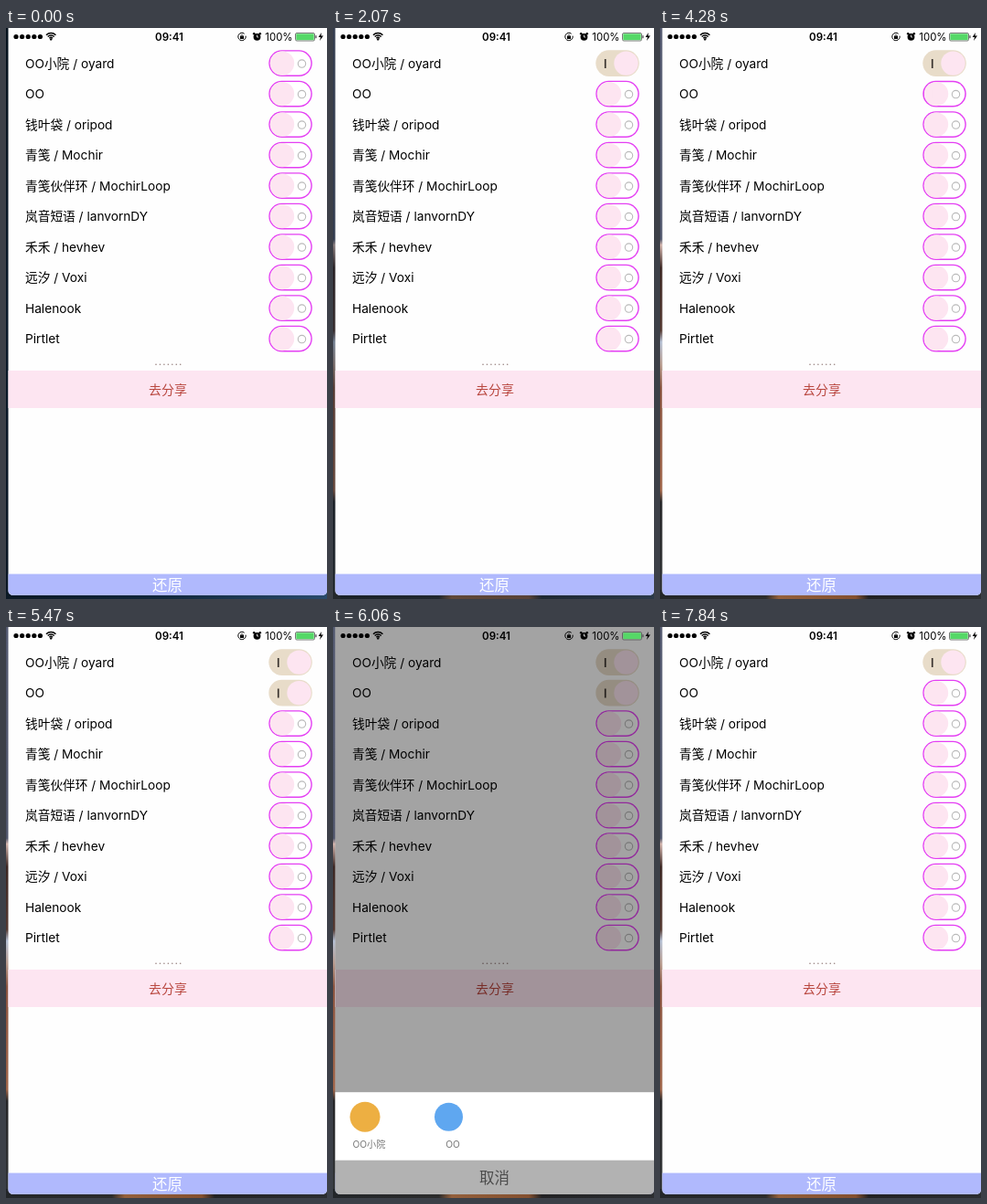
Write an HTML page with a canvas that moves like this. It is 351 px wide and 625 px high and loops after 7990 ms.

```html
<!DOCTYPE html>
<html lang="zh-CN">
<head>
<meta charset="utf-8">
<title>分享开关</title>
<style>
html, body { margin: 0; width: 100%; height: 100%; overflow: hidden; }
canvas { display: block; width: 351px; height: 625px; }
</style>
</head>
<body>
<canvas id="stage"></canvas>
<script>
const W = 351, H = 625, LOOP = 7990;
const FONT = 'Inter, "Noto Sans CJK SC", "Noto Sans CJK", sans-serif';
const PINK = '#fde5f1', TINT = [228, 62, 243], BEIGE = [232, 220, 201];
const ROWS = ['OO小院 / oyard', 'OO', '钱叶袋 / oripod', '青笺 / Mochir', '青笺伙伴环 / MochirLoop',
  '岚音短语 / lanvornDY', '禾禾 / hevhev', '远汐 / Voxi', 'Halenook', 'Pirtlet'];

// Taps per row: [start, end, turns on]
const TAPS = {
  0: [[850, 1150, true], [3080, 3480, false], [3750, 4150, true]],
  1: [[4270, 4590, true], [7530, 7830, false]]
};
const SHEET = { open: 5560, opened: 5960, close: 6850, closed: 7100, height: 111.7 };

const BACKDROPS = [
  { side: [[0, '#07131e'], [0.5, '#0a1a2a'], [1, '#0b1724']],
    base: [[0, '#0c1925'], [0.5, '#12283c'], [1, '#2a4b6c']] },
  { side: [[0, '#545a70'], [0.37, '#50566c'], [0.38, '#d2b4ac'], [0.42, '#3c2723'], [0.53, '#553a32'],
      [0.55, '#b4c0d4'], [0.59, '#b79a8c'], [0.63, '#8a5440'], [0.81, '#a0664a'], [0.83, '#262628'], [1, '#333638']],
    base: [[0, '#232629'], [0.33, '#2c2c2c'], [0.37, '#94603c'], [0.61, '#84502f'], [0.65, '#222224'], [1, '#2c2e31']] }
];

const canvas = document.getElementById('stage');
const ctx = canvas.getContext('2d');
const dpr = window.devicePixelRatio || 1;
canvas.width = W * dpr;
canvas.height = H * dpr;

const clamp = v => Math.max(0, Math.min(1, v));
const ease = v => { v = clamp(v); return v * v * (3 - 2 * v); };
const span = (t, a, b) => clamp((t - a) / (b - a));
const mix = (a, b, k) => `rgb(${a.map((v, i) => Math.round(v + (b[i] - v) * k))})`;

function box(x, y, w, h, fill) {
  ctx.fillStyle = fill;
  ctx.fillRect(x, y, w, h);
}
function pill(x, y, w, h, r, fill) {
  ctx.beginPath();
  ctx.roundRect(x, y, w, h, r);
  ctx.fillStyle = fill;
  ctx.fill();
}
function disc(x, y, r, fill) {
  ctx.beginPath();
  ctx.arc(x, y, r, 0, 7);
  ctx.fillStyle = fill;
  ctx.fill();
}
function ring(x, y, r, color, width, from = 0, to = 7) {
  ctx.beginPath();
  ctx.arc(x, y, r, from, to);
  ctx.strokeStyle = color;
  ctx.lineWidth = width;
  ctx.stroke();
}
function line(points, color, width) {
  ctx.beginPath();
  points.forEach(([x, y]) => ctx.lineTo(x, y));
  ctx.strokeStyle = color;
  ctx.lineWidth = width;
  ctx.stroke();
}
function label(text, x, baseline, size, color, align = 'left', weight = 400) {
  ctx.font = `${weight} ${size}px ${FONT}`;
  ctx.textAlign = align;
  ctx.fillStyle = color;
  ctx.fillText(text, x, baseline);
}

function gradient(stops, x, y) {
  const g = ctx.createLinearGradient(0, 0, x, y);
  stops.forEach(([at, color]) => g.addColorStop(at, color));
  return g;
}
function drawBackdrop(t) {
  BACKDROPS.forEach((b, i) => {
    ctx.globalAlpha = i ? span(t, 780, 2900) : 1;
    box(0, 0, 8, H, gradient(b.side, 0, H));
    box(0, 615, W, 10, gradient(b.base, W, 0));
  });
  ctx.globalAlpha = 1;
}

function drawStatusBar() {
  for (let i = 0; i < 5; i++) disc(11 + i * 6.6, 9.5, 2.6, '#000');
  for (const r of [2.6, 5, 7.4]) ring(49.2, 13, r, '#000', 1.5, -Math.PI * 0.75, -Math.PI * 0.25);
  disc(49.2, 12.4, 1.2, '#000');
  label('09:41', 178.5, 13.8, 11.6, '#000', 'center', 600);

  ring(258, 9.5, 4.2, '#000', 1, -0.2, 5.4);
  box(256, 9, 4, 3, '#000');
  ring(258, 9, 1.3, '#000', 0.8, Math.PI, 7);

  disc(274.5, 9.8, 3.9, '#000');
  disc(271.2, 6.2, 1.3, '#000');
  disc(277.8, 6.2, 1.3, '#000');
  line([[274.5, 7.5], [274.5, 10], [276.2, 10]], '#fff', 0.8);

  label('100%', 313.5, 13.6, 11.4, '#000', 'right');
  ctx.beginPath();
  ctx.roundRect(316.5, 5.5, 21, 8.5, 1.5);
  ctx.strokeStyle = '#555';
  ctx.lineWidth = 0.8;
  ctx.stroke();
  box(317.3, 6.3, 19.4, 6.9, '#55d867');
  box(338.3, 8.2, 1.3, 3, '#555');
  ctx.beginPath();
  [[345, 5], [341.6, 10], [344, 10], [343, 14], [347, 8.6], [344.4, 8.6]].forEach(([x, y]) => ctx.lineTo(x, y));
  ctx.fillStyle = '#000';
  ctx.fill();
}

// The knob leads and the white inset follows when switching off.
function switchState(t, row) {
  let state = { on: 0, inset: 1 };
  for (const [start, end, turnsOn] of TAPS[row] || []) {
    if (t < start) break;
    const p = span(t, start, end);
    state = turnsOn
      ? { on: ease(p), inset: 1 - ease(p * 1.5) }
      : { on: 1 - ease(p / 0.7), inset: ease((p - 0.4) / 0.6) };
  }
  return state;
}
function drawSwitch(y, { on, inset }) {
  pill(287.3, y - 14.4, 47.5, 28.8, 14.4, mix(TINT, BEIGE, on));
  if (inset > 0) {
    ctx.save();
    ctx.translate(321, y);
    ctx.scale(inset, inset);
    pill(-32.3, -13, 44.7, 26, 13, '#fff');
    ctx.restore();
  }
  disc(302 + 18.5 * on, y, 13.2, PINK);
  ctx.globalAlpha = 1 - on;
  ring(323.5, y + 0.5, 4.2, '#b9b9b9', 1.1);
  ctx.globalAlpha = on;
  box(296.9, y - 4.6, 1.7, 10, '#3a342f');
  ctx.globalAlpha = 1;
}

function drawSheet(t) {
  if (t < SHEET.open || t >= SHEET.closed) return;
  if (t < SHEET.close) box(0, 0, W, H, 'rgba(0,0,0,.36)');
  const shown = ease(span(t, SHEET.open, SHEET.opened)) - ease(span(t, SHEET.close, SHEET.closed));
  ctx.save();
  ctx.translate(0, SHEET.height * (1 - shown));
  box(2, 509.2, W, 75, '#fff');
  disc(35, 536.2, 16.5, '#edaf42');
  disc(126.5, 536.2, 15.5, '#5fa7f0');
  label('OO小院', 39.5, 570.3, 10.2, '#777', 'center');
  label('OO', 131, 570.3, 10.2, '#777', 'center');
  box(2, 583.7, W, 40, '#b2b2b2');
  label('取消', 176.5, 608.8, 16.5, '#4c4c4c', 'center');
  ctx.restore();
}

function draw(t) {
  ctx.setTransform(dpr, 0, 0, dpr, 0, 0);
  drawBackdrop(t);
  ctx.save();
  ctx.beginPath();
  ctx.roundRect(2.5, -10, W - 2.5, 631, 5);
  ctx.clip();
  box(0, 0, W, H, '#fefefe');
  ROWS.forEach((name, i) => {
    const y = 38.6 + i * 33.5;
    label(name, 21, y + 4.9, 13.7, '#000');
    drawSwitch(y, switchState(t, i));
  });
  for (let i = 0; i < 7; i++) disc(164 + i * 4.45, 368.2, 0.8, '#96807f');
  box(2, 375, W, 41, PINK);
  label('去分享', 177, 401, 14, '#b9473f', 'center');
  box(2, 597.6, W, 25, '#b0b9fd');
  label('还原', 176.5, 615.6, 16.5, '#fff', 'center');
  drawSheet(t);
  drawStatusBar();
  ctx.restore();
}

const begin = performance.now();
function tick() {
  draw((performance.now() - begin) % LOOP);
  requestAnimationFrame(tick);
}
tick();
</script>
</body>
</html>
```
